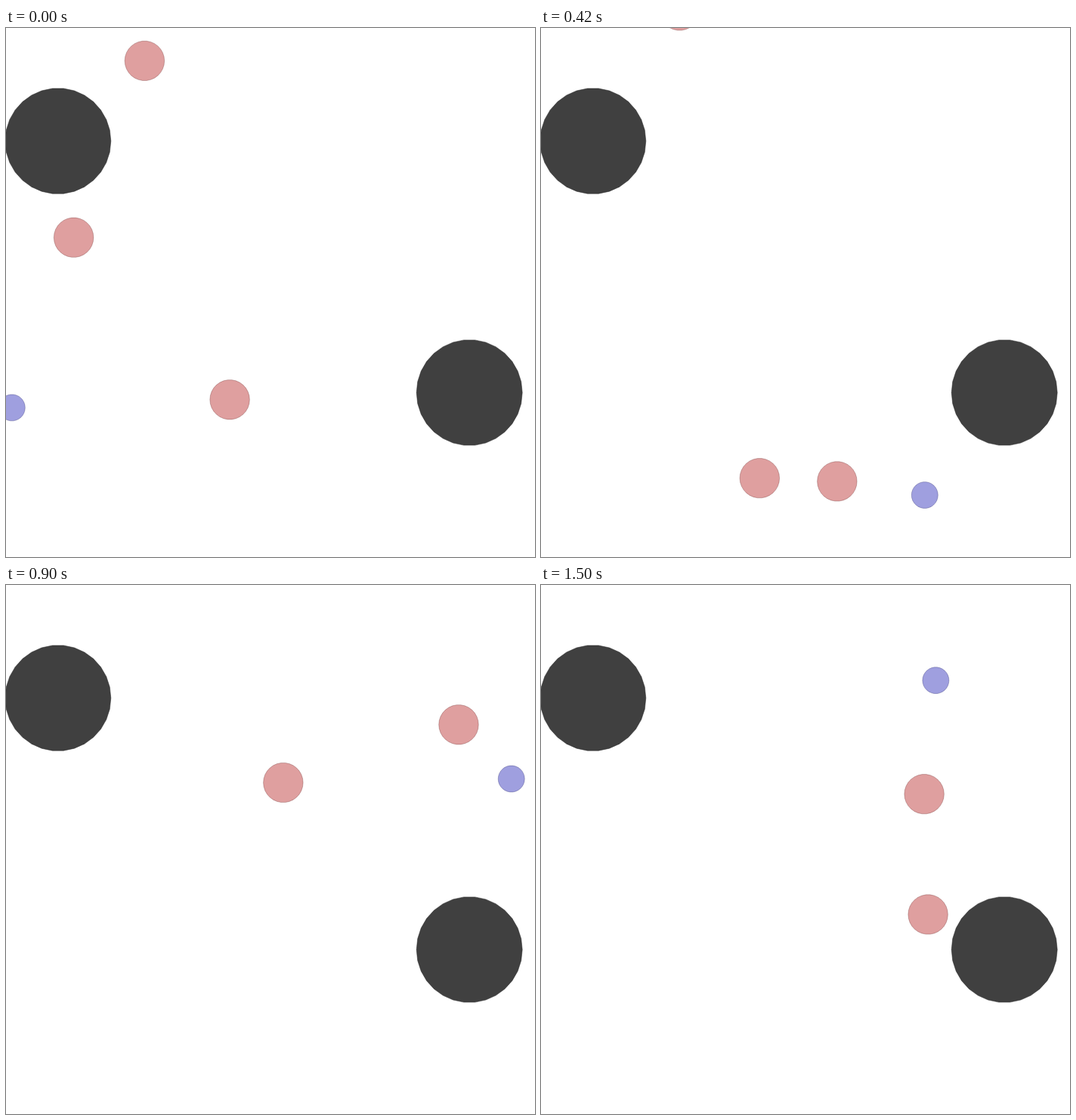
These frames come from a looping animation (700x700 px, 1530 ms). An HTML page with a canvas:

```html
<!DOCTYPE html>
<html lang="en">
<head>
<meta charset="utf-8">
<title>Chase</title>
<style>
html, body { margin: 0; width: 100%; height: 100%; overflow: hidden; background: #fff; }
canvas { display: block; width: 700px; height: 700px; }
</style>
</head>
<body>
<canvas id="stage" width="700" height="700"></canvas>
<script>
const ctx = document.getElementById('stage').getContext('2d');
const STEP = 30, STEPS = 51;
const DIRS = { l: [-1, 0], r: [1, 0], u: [0, -1], d: [0, 1], n: [0, 0] };

const rocks = [[68.8, 149.6], [613.2, 482.5]].map(([x, y]) => ({ x, y, r: 70 }));

const RED = { r: 26.25, push: 31.5, top: 35, fill: '#df9f9f', line: 'rgba(96,32,32,.3)' };
const BLUE = { r: 17.5, push: 56, top: 45.5, fill: '#9f9fdf', line: 'rgba(32,32,96,.3)' };
const ROCK = { r: 70, fill: '#404040', line: 'rgba(32,32,32,.5)' };

// Moves are run lengths: a direction and how many steps it is held.
const agents = [
  { kind: RED, x: 183.4, y: 43.4, moves: 'n12 u38' },
  { kind: RED, x: 89.6, y: 277.2, moves: 'd8 r7 u12 d11 r3 u9' },
  { kind: RED, x: 296.1, y: 491.8, moves: 'l4 d2 r9 u11 r4 d10 l5 u5' },
  { kind: BLUE, x: 7.8, y: 502.4, moves: 'r1 u1 d3 r9 u10 n1 r1 d1 r1 d9 l2 u11' }
];

// Damped motion with a speed limit; rocks push back softly.
function trace({ kind, x, y, moves }) {
  const path = [[x, y]];
  let vx = 0, vy = 0;
  const keys = moves.split(' ').map(m => m[0].repeat(+m.slice(1))).join('');
  for (const key of keys) {
    let fx = DIRS[key][0] * kind.push, fy = DIRS[key][1] * kind.push;
    for (const rock of rocks) {
      const dx = x - rock.x, dy = y - rock.y, dist = Math.hypot(dx, dy);
      const soft = 0.35 * Math.log1p(Math.exp((rock.r + kind.r - dist) / 0.35));
      fx += dx / dist * soft;
      fy += dy / dist * soft;
    }
    vx = vx * 0.75 + fx;
    vy = vy * 0.75 + fy;
    const limit = Math.min(1, kind.top / (Math.hypot(vx, vy) || 1));
    vx *= limit;
    vy *= limit;
    x += vx;
    y += vy;
    path.push([x, y]);
  }
  return path;
}

const paths = agents.map(trace);

function disc(x, y, { r, fill, line }) {
  ctx.beginPath();
  for (let i = 0; i < 30; i++) {
    const a = i * Math.PI / 15;
    ctx.lineTo(x + r * Math.cos(a), y + r * Math.sin(a));
  }
  ctx.closePath();
  ctx.fillStyle = fill;
  ctx.fill();
  ctx.strokeStyle = line;
  ctx.stroke();
}

function draw(n) {
  ctx.fillStyle = '#fff';
  ctx.fillRect(0, 0, 700, 700);
  agents.forEach(({ kind }, i) => disc(...paths[i][n], kind));
  rocks.forEach(({ x, y }) => disc(x, y, ROCK));
}

const start = performance.now();
function tick() {
  draw(Math.floor((performance.now() - start) / STEP + 0.001) % STEPS);
  requestAnimationFrame(tick);
}
tick();
</script>
</body>
</html>
```
